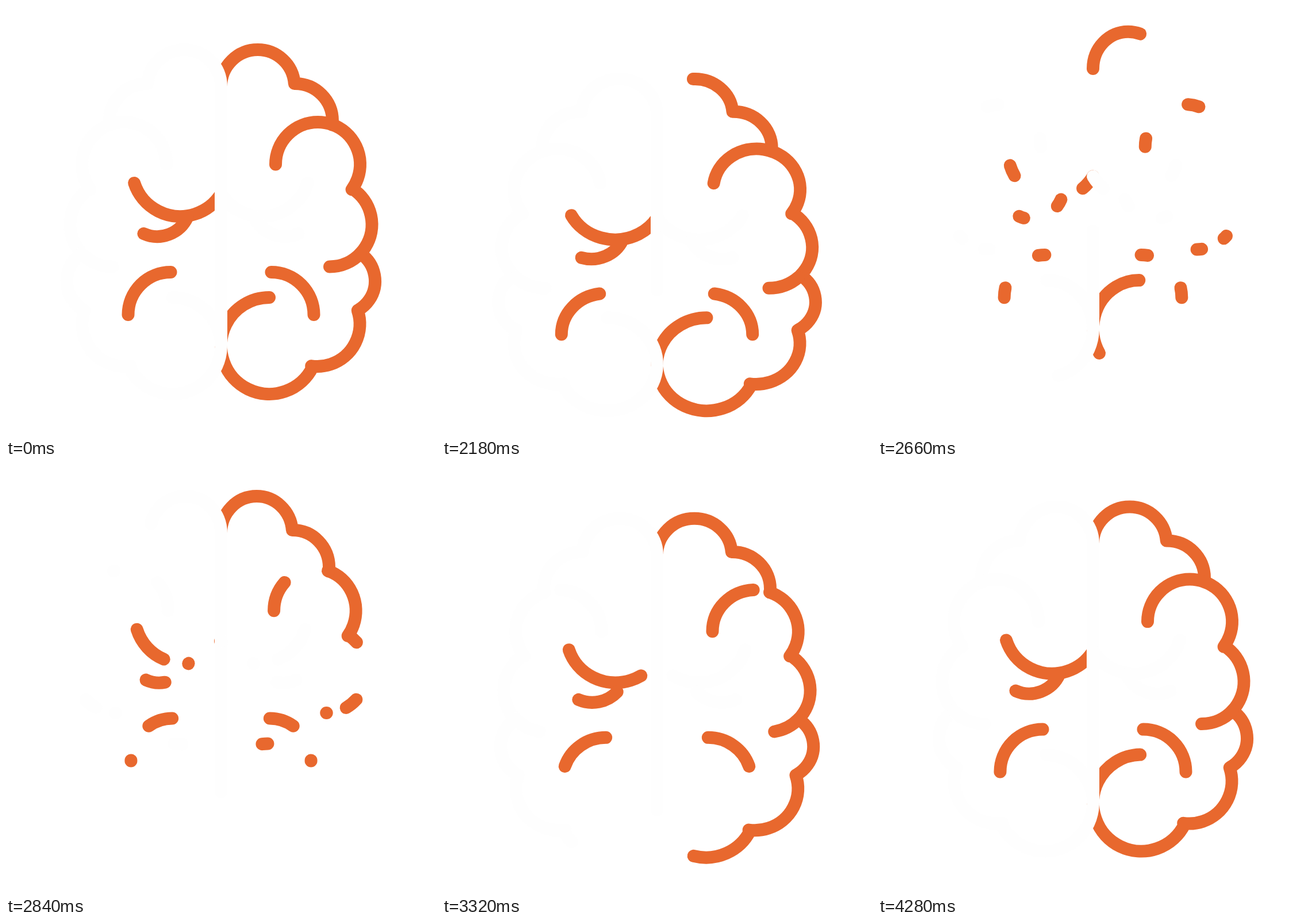
Recreate the animation shown at these times as an HTML page with a canvas. Size 748 by 748 pixels, loop 4.4 s.

```html
<!DOCTYPE html>
<html lang="en">
<head>
<meta charset="utf-8">
<title>Brain</title>
<style>
  html, body { margin: 0; width: 100%; height: 100%; overflow: hidden; background: #fff; }
  canvas { display: block; width: 748px; height: 748px; }
</style>
</head>
<body>
<canvas id="stage" width="748" height="748"></canvas>
<script>
const ctx = document.getElementById('stage').getContext('2d');
const LOOP = 4400, START = 2030, STEP = 30, LAST = 4280;
const AXIS = 374, ORANGE = '#e8682e', PALE = '#fefefe';

// Arcs: [cx, cy, radius, from°, to°]; lines: [x0, y0, x1, y1]. All for the right half.
const outline = [
  [438, 140, 64, 180, 355.5],
  [503, 200, 65, -90, 6],
  [542.5, 275.5, 73.5, -70.5, 36.5],
  [563, 380, 73.5, -57.5, 43],
  [584, 478.5, 58, -55.5, 60],
  [541.5, 553, 74, -18.5, 98],
  [458, 591, 84, 26, 270]
];
const spine = [[AXIS, 591, AXIS, 140]];
const upperBranch = [[542.5, 275.5, 73.5, 180, 289.5]];
const lowerBranch = [[563, 380, 73.5, 43, 90]];
const quarter = [[461.5, 537, 74, 270, 360]];
const fold = [[445, 282, 84, 18, 147.6]];
const smallFold = [[485, 343, 58, 66, 155.6]];

// [path, side, colour], painted in this order
const strokes = [
  [outline, 1, ORANGE], [upperBranch, 1, ORANGE], [lowerBranch, 1, ORANGE],
  [quarter, 1, ORANGE], [quarter, -1, ORANGE],
  [fold, -1, ORANGE], [smallFold, -1, ORANGE],
  [[...spine, ...outline], -1, PALE], [upperBranch, -1, PALE], [lowerBranch, -1, PALE],
  [fold, 1, PALE], [smallFold, 1, PALE]
];

// [time, drop, scaleX, scaleY]
const poses = [
  [2000, 0, 1, 1],
  [2300, 62, 1.045, 0.944],
  [2700, -33, 0.953, 1.005],
  [3140, 20, 1.022, 0.978],
  [3640, 0.5, 1, 1],
  [LAST, -1.4, 1, 1]
];

const clamp = u => Math.min(1, Math.max(0, u));
const smooth = u => u * u * (3 - 2 * u);
const rad = deg => deg * Math.PI / 180;

// Cubic bezier easing with handles (x1, 0) and (x2, 1)
function ease(u, x1, x2) {
  u = clamp(u);
  let lo = 0, hi = 1;
  for (let i = 0; i < 30; i++) {
    const s = (lo + hi) / 2, r = 1 - s;
    if (3 * r * r * s * x1 + 3 * r * s * s * x2 + s * s * s < u) lo = s; else hi = s;
  }
  return u === 0 || u === 1 ? u : smooth(lo);
}

function poseAt(t) {
  const i = poses.findIndex(p => p[0] > t);
  if (i === 0) return poses[0].slice(1);
  if (i < 0) return poses[poses.length - 1].slice(1);
  const a = poses[i - 1], b = poses[i];
  const k = smooth((t - a[0]) / (b[0] - a[0]));
  return [1, 2, 3].map(j => a[j] + (b[j] - a[j]) * k);
}

const length = s => s.length === 4
  ? Math.hypot(s[2] - s[0], s[3] - s[1])
  : s[2] * rad(s[4] - s[3]);

function tracePart(path, from, to) {
  const total = path.reduce((sum, s) => sum + length(s), 0);
  let pos = 0;
  for (const s of path) {
    const len = length(s);
    const a = clamp((from * total - pos) / len), b = clamp((to * total - pos) / len);
    pos += len;
    if (b <= a) continue;
    if (s.length === 4) {
      const [x0, y0, x1, y1] = s;
      ctx.lineTo(x0 + (x1 - x0) * a, y0 + (y1 - y0) * a);
      ctx.lineTo(x0 + (x1 - x0) * b, y0 + (y1 - y0) * b);
    } else {
      const [cx, cy, r, d0, d1] = s;
      ctx.arc(cx, cy, r, rad(d0 + (d1 - d0) * a), rad(d0 + (d1 - d0) * b));
    }
  }
}

function strokePart([path, side, colour], from, to, [drop, sx, sy]) {
  if (to <= from) return;
  ctx.beginPath();
  ctx.setTransform(side * sx, 0, 0, sy, AXIS * (1 - side * sx), AXIS * (1 - sy) + drop);
  tracePart(path, from, to);
  ctx.setTransform(1, 0, 0, 1, 0, 0); // keeps the line width even
  ctx.strokeStyle = colour;
  ctx.stroke();
}

function draw(t) {
  const pose = poseAt(t);
  const erased = ease((t - 2000) / 900, 0.42, 0.58);
  const redrawn = ease((t - 2505) / 1890, 0.17, 0.0955);
  ctx.fillStyle = '#fff';
  ctx.fillRect(0, 0, 748, 748);
  ctx.lineWidth = 22;
  ctx.lineCap = ctx.lineJoin = 'round';
  for (const s of strokes) {
    strokePart(s, erased, 1, pose);
    strokePart(s, 0, redrawn, pose);
  }
}

const origin = performance.now();
function tick() {
  const t = (performance.now() - origin) % LOOP;
  draw(t < START ? 0 : Math.min(LAST, START + STEP * Math.floor((t - START) / STEP)));
  requestAnimationFrame(tick);
}
tick();
</script>
</body>
</html>
```
